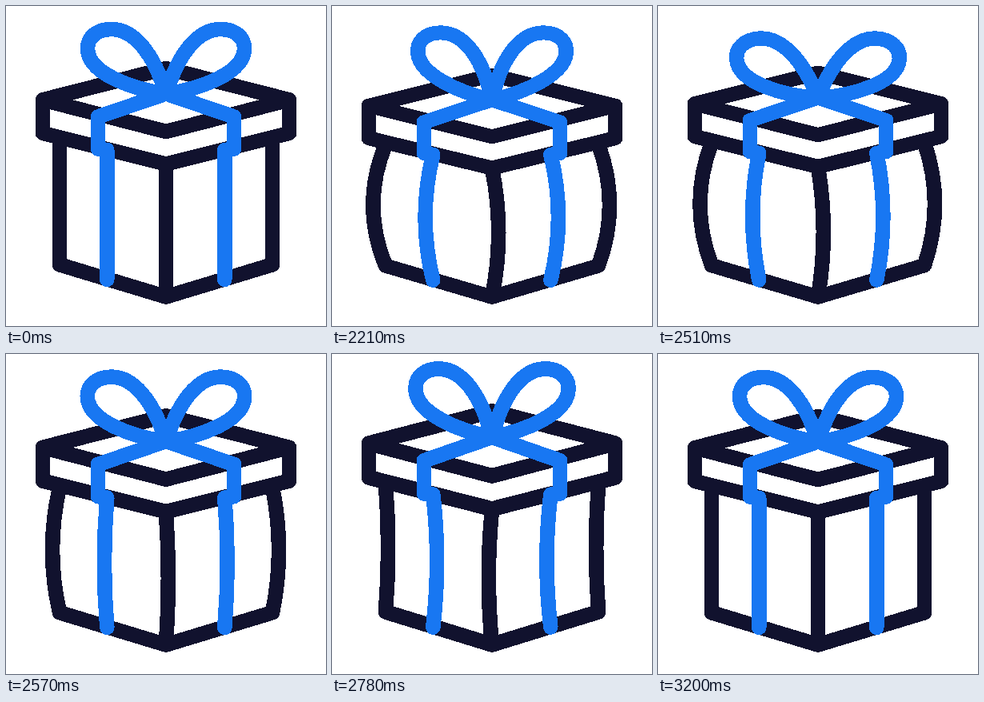
An HTML page that plays this animation: 400x400 px, repeating every 3.23 s.

```html
<!DOCTYPE html>
<html lang="en">
<head>
<meta charset="utf-8">
<title>Gift box</title>
<style>
  html, body { margin: 0; width: 100%; height: 100%; overflow: hidden; background: #fff; }
  svg { display: block; width: 100%; height: 100%; shape-rendering: crispEdges; }
  g { fill: none; stroke-width: 18.6; stroke-linecap: round; stroke-linejoin: round; }
  .box { stroke: #11122e; }
  .ribbon { stroke: #1877f2; }
</style>
</head>
<body>
<svg viewBox="0 0 400 400">
  <g id="gift">
    <g class="box">
      <path id="body"/>
      <path d="M46 117.3L200 78L354 117.3L200 157ZM46 117.3V159L200 197.5L354 159V117.3"/>
    </g>
    <g class="ribbon">
      <path id="strands"/>
      <path d="M126 180L115 178.5V138.5L200 109.5L285 138.5V178.5L274 180"/>
      <g transform="translate(200 110)">
        <path id="loop" d="M0 0C-15 -50 -40 -81 -68 -81C-86 -81 -98 -71 -98 -57C-98 -25 -40 -6 0 0"/>
        <use href="#loop" transform="scale(-1 1)"/>
      </g>
    </g>
  </g>
</svg>
<script>
const LOOP = 3230, STEP = 30, START = 2000, BASE = 370;

const easeOut = u => Math.sin(u * Math.PI / 2);
const easeIn = u => u ** 3;
const easeBoth = u => (1 - Math.cos(u * Math.PI)) / 2;

// Poses the box passes through: squash, stretch, land, rebound, rest
const rest = { at: 0, scale: 1, side: 0, inner: 0 };
const poses = [
  rest,
  { at: 330, ease: easeOut, scale: 0.965, side: 18.5, inner: 11.5 },
  { at: 660, ease: easeIn, scale: 1.061, side: -6.3, inner: -9.7 },
  { ...rest, at: 900, ease: easeBoth, scale: 0.983 },
  { ...rest, at: 1080, ease: easeBoth, scale: 1.008 },
  { ...rest, at: 1200, ease: easeBoth },
];

// The bow loops lift and droop around the knot, in degrees
const flaps = [
  { at: 0, angle: 0 },
  { at: 210, ease: easeOut, angle: 5 },
  { at: 490, ease: easeBoth, angle: -4.4 },
  { at: 660, ease: easeBoth, angle: 4.8 },
  { at: 900, ease: easeBoth, angle: 0 },
];

function sample(keys, name, t) {
  const i = keys.findIndex(key => key.at > t);
  if (i < 0) return keys[keys.length - 1][name];
  const a = keys[i - 1], b = keys[i];
  return a[name] + (b[name] - a[name]) * b.ease((t - a.at) / (b.at - a.at));
}

const set = (id, name, text) => document.getElementById(id).setAttribute(name, text);
const bent = (x, top, bottom, bulge) =>
  `M${x} ${top}Q${x + 2 * bulge} ${(top + bottom) / 2} ${x} ${bottom}`;

function draw(now) {
  const t = Math.max(0, Math.floor((now % LOOP - START) / STEP) * STEP);
  const [scale, side, inner] = ['scale', 'side', 'inner'].map(name => sample(poses, name, t));

  set('gift', 'transform', `translate(0 ${BASE}) scale(1 ${scale}) translate(0 ${-BASE})`);
  set('body', 'd', bent(67, 167, 323.3, -side) + 'L200 363.5L333 323.3'
    + bent(333, 167, 323.3, side * 0.9) + bent(200, 198, 363.5, inner * 0.85));
  set('strands', 'd', bent(126.3, 180, 342, -inner) + bent(273.3, 180, 342, inner));
  set('loop', 'transform', `rotate(${sample(flaps, 'angle', t)})`);
  requestAnimationFrame(draw);
}
requestAnimationFrame(draw);
</script>
</body>
</html>
```
